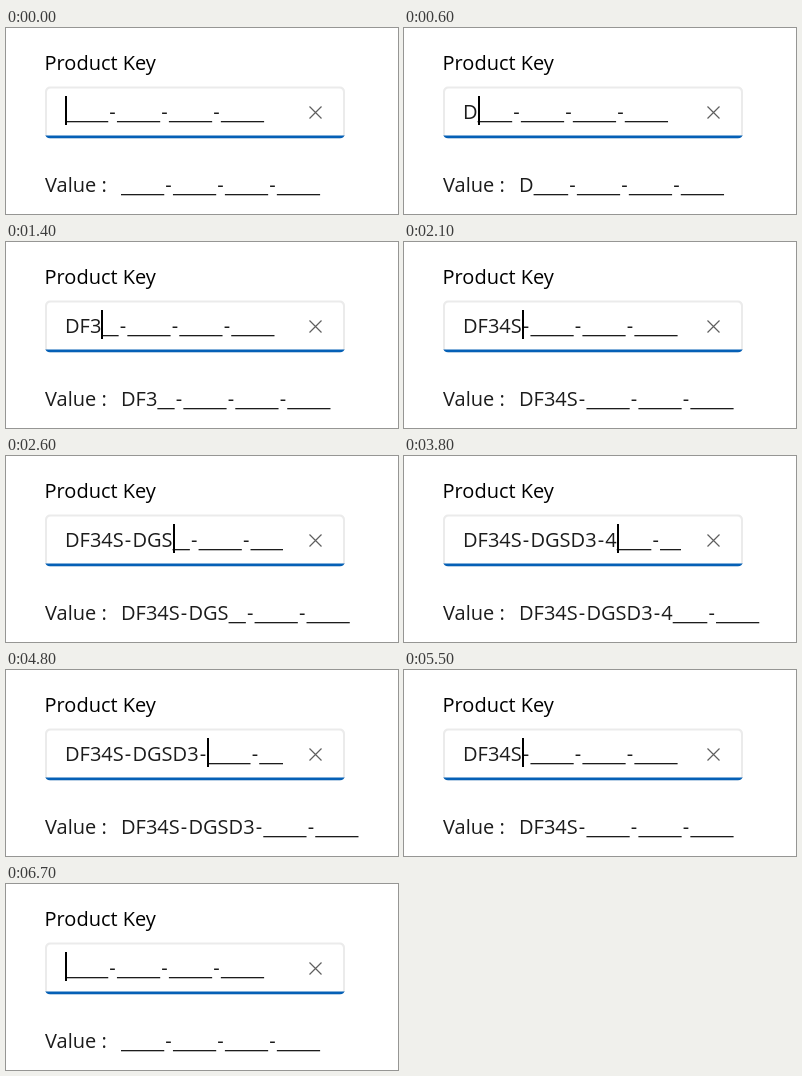
These frames come from a looping animation (392x186 px, 6.8 s). An HTML page with a canvas:

```html
<!DOCTYPE html>
<html lang="en">
<head>
<meta charset="utf-8">
<title>Product Key</title>
<style>
html, body { margin: 0; width: 100%; height: 100%; overflow: hidden; background: #fff; }
canvas { display: block; }
</style>
</head>
<body>
<canvas id="stage" width="392" height="186"></canvas>
<script>
const ctx = document.getElementById('stage').getContext('2d');
const LOOP = 6800;
const KEY = 'DF34SDGSD34';
const GROUP = 5, GROUPS = 4;
const BLANK = 8.65, DASH = 8.7;

// Each entry: time in ms, count of typed characters
const steps = [
  [0, 0], [600, 1], [900, 2], [1400, 3], [1600, 4], [2000, 5],
  [2200, 6], [2300, 7], [2600, 8], [2800, 9], [3300, 10], [3600, 11],
  [4800, 10], [5300, 9], [5400, 7], [5500, 5], [5600, 2], [5700, 0]
];

function typedAt(t) {
  let n = 0;
  for (const [time, count] of steps) if (t >= time) n = count;
  return n;
}

// Draws the masked key and returns the caret position
function drawKey(x, base, typed, pastDash) {
  let caret = x;
  for (let g = 0; g < GROUPS; g++) {
    const start = g * GROUP;
    if (g) {
      ctx.fillText('-', x + 1.1, base);
      x += DASH;
      if (pastDash && typed === start) caret = x;
    }
    const filled = Math.max(0, Math.min(GROUP, typed - start));
    if (filled) {
      const part = KEY.substr(start, filled);
      ctx.fillText(part, x, base);
      x += ctx.measureText(part).width;
      caret = x;
    }
    const rest = (GROUP - filled) * BLANK;
    if (rest) ctx.fillRect(x, base + 2, rest, 1.3);
    x += rest;
  }
  return caret;
}

function drawField() {
  ctx.save();
  ctx.beginPath();
  ctx.roundRect(39, 58.5, 300, 52, 5);
  ctx.clip();
  ctx.fillStyle = '#ebebeb';
  ctx.fillRect(39, 58, 300, 53);
  ctx.fillStyle = '#fff';
  ctx.beginPath();
  ctx.roundRect(41, 60.5, 296, 49, 4);
  ctx.fill();
  ctx.fillStyle = '#0560b6';
  ctx.fillRect(39, 107.5, 300, 3);
  ctx.restore();

  ctx.strokeStyle = '#5f5f5f';
  ctx.lineWidth = 1.2;
  ctx.beginPath();
  ctx.moveTo(303.5, 78.5);
  ctx.lineTo(315.5, 90.5);
  ctx.moveTo(315.5, 78.5);
  ctx.lineTo(303.5, 90.5);
  ctx.stroke();
}

function draw(t) {
  const typed = typedAt(t);
  const pastDash = t >= 4800 && t < 5300;

  ctx.fillStyle = '#fff';
  ctx.fillRect(0, 0, 392, 186);
  drawField();

  ctx.font = '20px "Open Sans", "Noto Sans", sans-serif';
  ctx.textBaseline = 'alphabetic';
  ctx.fillStyle = '#000';
  ctx.fillText('Product Key', 38.5, 42);

  ctx.fillStyle = '#1c1c1c';
  ctx.fillText('Value :', 39, 164);
  drawKey(115, 164, typed, pastDash);

  ctx.save();
  ctx.beginPath();
  ctx.rect(50, 62, 227, 44);
  ctx.clip();
  const caret = drawKey(59, 91, typed, pastDash);
  ctx.fillStyle = '#000';
  ctx.fillRect(Math.round(caret), 68, 2, 29);
  ctx.restore();
}

const begin = performance.now();
function frame() {
  draw((performance.now() - begin) % LOOP);
  requestAnimationFrame(frame);
}
frame();
</script>
</body>
</html>
```
